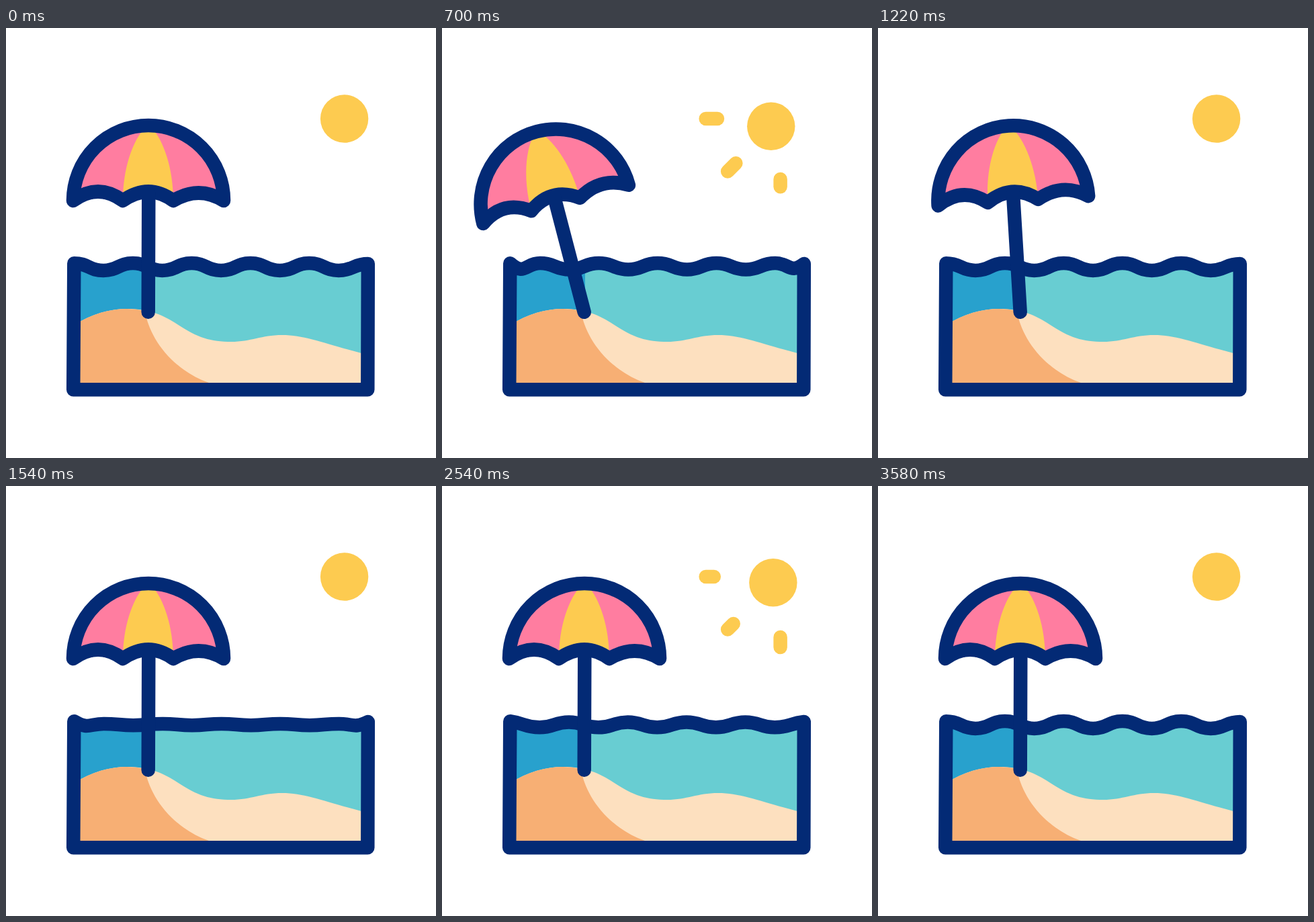
Write an HTML page that moves like this. It is 640 px wide and 640 px high and loops after 3.6 s.

```html
<!DOCTYPE html>
<html>
<head>
<meta charset="utf-8">
<title>Beach</title>
<style>
html, body { margin: 0; width: 100%; height: 100%; overflow: hidden; background: #fff; }
svg { display: block; width: 100vw; height: 100vh; }
.line { fill: none; stroke: #032a75; stroke-width: 20.5; stroke-linecap: round; stroke-linejoin: round; }
#rays { fill: none; stroke: #fdcb50; stroke-width: 20.5; stroke-linecap: round; }
</style>
</head>
<body>
<svg viewBox="0 0 640 640">
  <defs>
    <clipPath id="box"><path id="boxShape"/></clipPath>
  </defs>
  <circle id="sun" r="35.7" fill="#fdcb50"/>
  <g id="rays"><path/><path/><path/></g>

  <g clip-path="url(#box)">
    <rect x="90" y="330" width="460" height="220" fill="#68cdd2"/>
    <rect x="90" y="330" width="123" height="110" fill="#28a1cd"/>
    <path fill="#fde0bf" d="M100 443C128 425 155 418 180 418C215 418 235 428 255 441C285 461 305 467 335 467C365 467 380 457 411 457C445 457 475 470 529 484L550 489V550H100Z"/>
    <path fill="#f7af74" d="M100 443C128 425 155 418 180 418Q194 418 207 421C212 458 245 508 302 528L340 540H100Z"/>
  </g>
  <path id="frame" class="line"/>

  <g id="umbrella">
    <path fill="#ff7da0" d="M100 257A112 112 0 0 1 324 257Q287 234 249 257Q212 230 174 257Q137 230 100 257Z"/>
    <path fill="#fdcb50" d="M174 257C174 212 187 168 209 146H215C236 168 249 212 249 257Q212 230 174 257Z"/>
    <path class="line" d="M100 257A112 112 0 0 1 324 257Q287 234 249 257Q212 230 174 257Q137 230 100 257Z"/>
    <path class="line" d="M212.3 246L211.7 422.8"/>
  </g>
</svg>
<script>
const LOOP = 3600;
const $ = id => document.getElementById(id);
const rays = $('rays').children;
const mix = (a, b, k) => a + (b - a) * k;

const ease = x => {
  x = Math.min(1, Math.max(0, x));
  return x * x * (3 - 2 * x);
};

// Rises from start to peak, then falls back to zero at end
const swell = (t, start, peak, end) =>
  t < peak ? ease((t - start) / (peak - start)) : ease((end - t) / (end - peak));

function wavePath(k) {
  const n = 10, left = 101.3, step = 43.75;
  const pts = [];
  for (let i = 0; i <= n; i++) {
    const odd = i % 2, inner = i > 0 && i < n;
    pts.push({
      x: left + step * i + (inner ? k : 0),
      y: odd ? mix(361, 349.2, k) : inner ? mix(350, 360.2, k) : i ? 351 : 350.2
    });
  }
  let d = `M${pts[0].x} ${pts[0].y}`;
  for (let i = 0; i < n; i++) {
    const a = pts[i], b = pts[i + 1];
    const y1 = a.y + (i === 0 ? 21 * k : 0);
    const y2 = b.y + (i === n - 1 ? 17 * k : 0);
    d += `C${a.x + 21.5} ${y1} ${b.x - 21.5} ${y2} ${b.x} ${b.y}`;
  }
  return d + 'L538.3 538.2L100.2 538.2Z';
}

// Centre line runs between two radii around the resting sun
function drawRay(el, deg, from, to) {
  const a = deg * Math.PI / 180;
  const at = r => `${503.6 + r * Math.cos(a)} ${135 + r * Math.sin(a)}`;
  el.setAttribute('d', `M${at(from)}L${at(to)}`);
  el.style.display = Math.abs(to - from) < 0.05 ? 'none' : '';
}

function draw(t) {
  const angle = -15 * swell(t, 0, 750, 1445);
  $('umbrella').setAttribute('transform', `rotate(${angle} 211.7 422.8)`);

  const s = t < 2100 ? t : t - 2100;
  const shift = swell(s, 0, 650, 1200);
  $('sun').setAttribute('cx', 503.6 - 14.2 * shift);
  $('sun').setAttribute('cy', 135 + 11.6 * shift);

  const near = 90, far = 111, len = far - near;
  const side = swell(s, 195, 640, 870);
  const down = swell(s, 195, 575, 838);
  drawRay(rays[0], 180, far, far - len * side);
  drawRay(rays[1], 135, far, far - len * side);
  drawRay(rays[2], 90, near, near + len * down);

  const d = wavePath(swell(t % 1200, 0, 600, 1200));
  $('frame').setAttribute('d', d);
  $('boxShape').setAttribute('d', d);
}

function tick() {
  draw(performance.now() % LOOP);
  requestAnimationFrame(tick);
}
tick();
</script>
</body>
</html>
```
